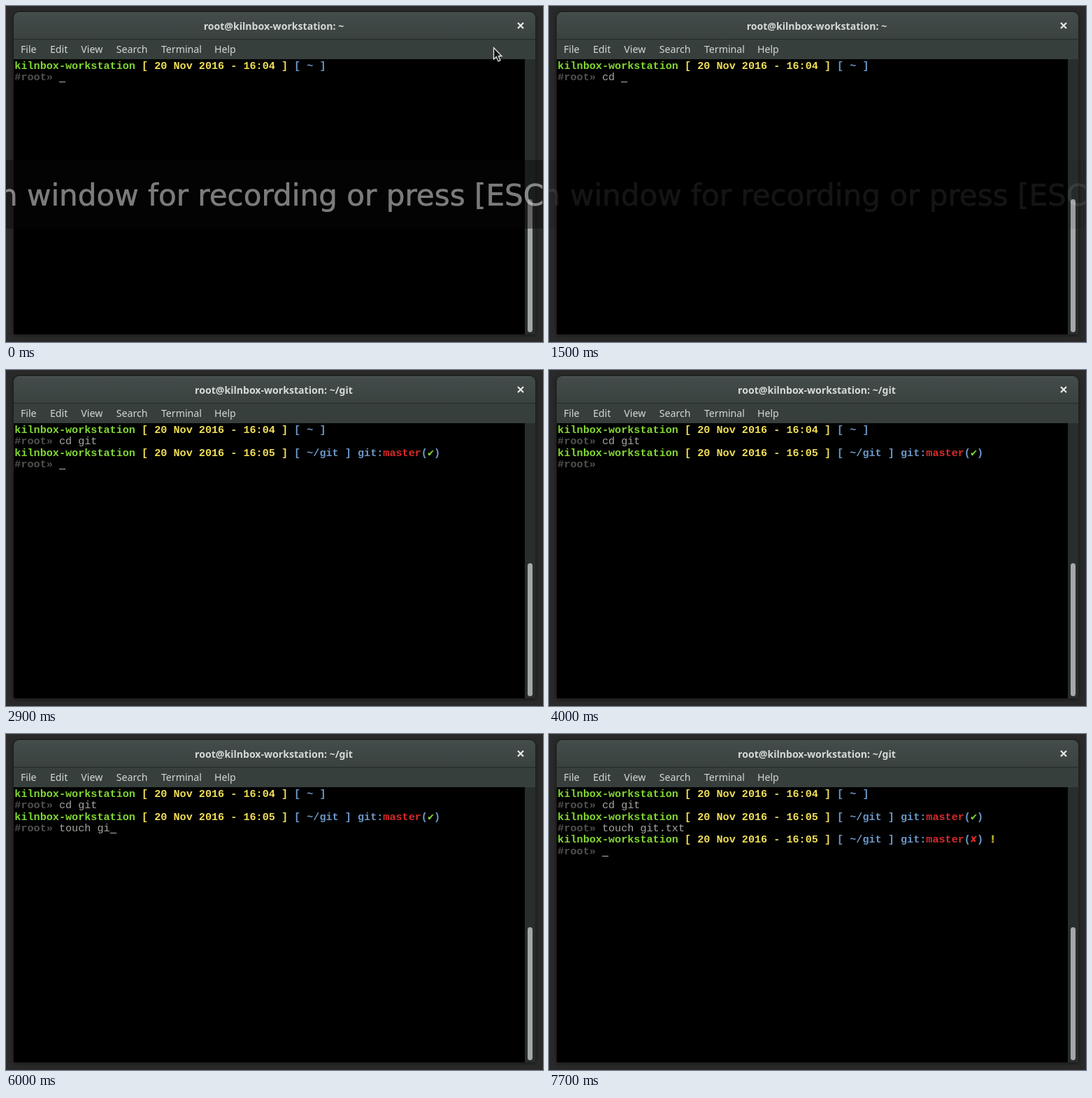
An HTML page for the animation above (8000 ms loop, 768 by 480 pixels).

```html
<!DOCTYPE html>
<html lang="en">
<head>
<meta charset="utf-8">
<title>Terminal session</title>
<style>
  html, body { margin: 0; width: 100%; height: 100%; overflow: hidden; background: #2a2a2a; }
  #stage { position: absolute; left: 0; top: 0; width: 768px; height: 480px; overflow: hidden; }
  #stage div, #menu span, #stage svg { position: absolute; white-space: pre; }
  #window { left: 11px; top: 9px; width: 746px; height: 460px; border-radius: 7px 7px 0 0;
    background: #000; box-shadow: 0 1px 6px rgba(0, 0, 0, .55); overflow: hidden; }
  #titlebar { left: 0; top: 0; width: 746px; height: 39px; box-sizing: border-box;
    background: linear-gradient(#434c4a, #39423f); border-top: 1px solid #525b59;
    border-bottom: 1px solid #232928; }
  #title { left: 0; top: 0; width: 744px; text-align: center; color: #d6dad8;
    font: bold 14.1px/38px "Noto Sans", "Open Sans", sans-serif; }
  #menu { left: 1.3px; top: 39px; width: 746px; height: 28px; color: #d3d7d4;
    font: 14.2px/28px "Noto Sans", "Open Sans", sans-serif; }
  #menubar { left: 0; top: 39px; width: 746px; height: 28px; background: #373f3d; }
  #track { left: 731px; top: 67px; width: 15px; height: 393px; background: #282e2d; }
  #thumb { left: 735px; top: 267px; width: 7px; height: 190px; border-radius: 3.5px; background: #a6a8a7; }
  #screen { left: 12.3px; top: 78px; color: #a4a6a1;
    font: 15.15px/16.35px "Liberation Mono", "DejaVu Sans Mono", monospace; }
  #screen b { font-weight: bold; }
  #caret { width: 1ch; height: 1px; background: #b4b6b1; }
  .host, .ok { color: #82d832; }
  .date { color: #f0de56; }
  .path { color: #6c97c8; }
  .branch, .bad { color: #d92a2a; }
  .hash { color: #50524f; }
  .warn { color: #e8dc3c; -webkit-text-stroke: 1px #8b8420; }
  #banner { left: 0; top: 220px; width: 768px; height: 98px; background: rgba(8, 8, 8, .42);
    color: rgba(255, 255, 255, .47); font: 42.1px/101px "DejaVu Sans", sans-serif;
    -webkit-text-stroke: .7px rgba(255, 255, 255, .3); }
  #banner div { top: 0; }
</style>
</head>
<body>
<div id="stage">
  <div id="window">
    <div id="titlebar"><div id="title"></div></div>
    <div id="menubar"></div>
    <div id="menu"></div>
    <div id="track"></div>
    <div id="thumb"></div>
    <svg style="left:720px;top:14px" width="10" height="10">
      <path d="M1 1L9 9M9 1L1 9" stroke="#e6e9e7" stroke-width="2.2"/>
    </svg>
  </div>
  <div id="screen"><div id="rows"></div><div id="caret"></div></div>
  <div id="banner">
    <div style="right:738px">on </div>
    <div style="left:30px">window for recording or press [ESC]</div>
  </div>
  <svg id="pointer" style="left:696px;top:58px" width="16" height="24">
    <path d="M1.5 1.5V18L5.3 14.5L8 21L11 19.7L8.3 13.5H13Z" fill="#161616" stroke="#e4e4e4" stroke-width="1.3"/>
  </svg>
</div>
<script>
const LOOP = 8000, STEP = 100, ROW = 16.35, BLINK = 600, FADE = 2700;
const HOST = "kilnbox-workstation";
const byId = id => document.getElementById(id);
const bold = (kind, text) => `<b class="${kind}">${text}</b>`;

// Each session starts at `start`, types `text` at the times in `keys`.
const sessions = [
  { start: 0, clock: "16:04", path: "~", git: "",
    text: "cd git", keys: [1100, 1200, 1400, 1800, 2100, 2400] },
  { start: 2900, clock: "16:05", path: "~/git", git: bold("ok", "✔"), tail: "",
    text: "touch git.txt",
    keys: [4200, 4500, 4700, 4800, 4900, 5000, 5400, 5700, 6200, 6300, 6700, 7000, 7300] },
  { start: 7700, clock: "16:05", path: "~/git", git: bold("bad", "✘"), tail: " " + bold("warn", "!"),
    text: "", keys: [] }
];

const menuItems = { File: 8.6, Edit: 50.6, View: 95, Search: 145.4, Terminal: 209.6, Help: 285.6 };
byId("menu").innerHTML = Object.entries(menuItems)
  .map(([label, x]) => `<span style="left:${x}px">${label}</span>`).join("");

function promptLine({ clock, path, git, tail }) {
  const status = git && " " + bold("path", "git:") + bold("branch", "master")
    + bold("path", "(") + git + bold("path", ")") + tail;
  return bold("host", HOST) + " " + bold("date", `[ 20 Nov 2016 - ${clock} ]`)
    + " " + bold("path", `[ ${path} ]`) + status;
}

function draw(t) {
  const active = sessions.filter(s => s.start <= t);
  const current = active[active.length - 1];
  const pressed = current.keys.filter(k => k <= t);
  const lines = active.flatMap(s => [
    promptLine(s),
    bold("hash", "#root»") + " " + s.text.slice(0, s.keys.filter(k => k <= t).length)
  ]);
  byId("rows").innerHTML = lines
    .map((line, i) => `<div style="top:${i * ROW}px;height:${ROW}px">${line}</div>`).join("");
  byId("title").textContent = `root@${HOST}: ${current.path}`;

  const lastInput = pressed.length ? pressed[pressed.length - 1] : current.start;
  const caret = byId("caret").style;
  caret.left = `${7 + pressed.length}ch`;
  caret.top = `${(lines.length - 1) * ROW + 14}px`;
  caret.visibility = Math.floor((t - lastInput) / BLINK) % 2 ? "hidden" : "visible";

  byId("banner").style.opacity = Math.max(0, 1 - t / FADE) ** 2.2;
  byId("pointer").style.visibility = t < 300 ? "visible" : "hidden";
}

let shown = -1;
function tick() {
  const t = Math.floor(performance.now() % LOOP / STEP) * STEP;
  if (t !== shown) draw(shown = t);
  requestAnimationFrame(tick);
}
tick();
</script>
</body>
</html>
```
